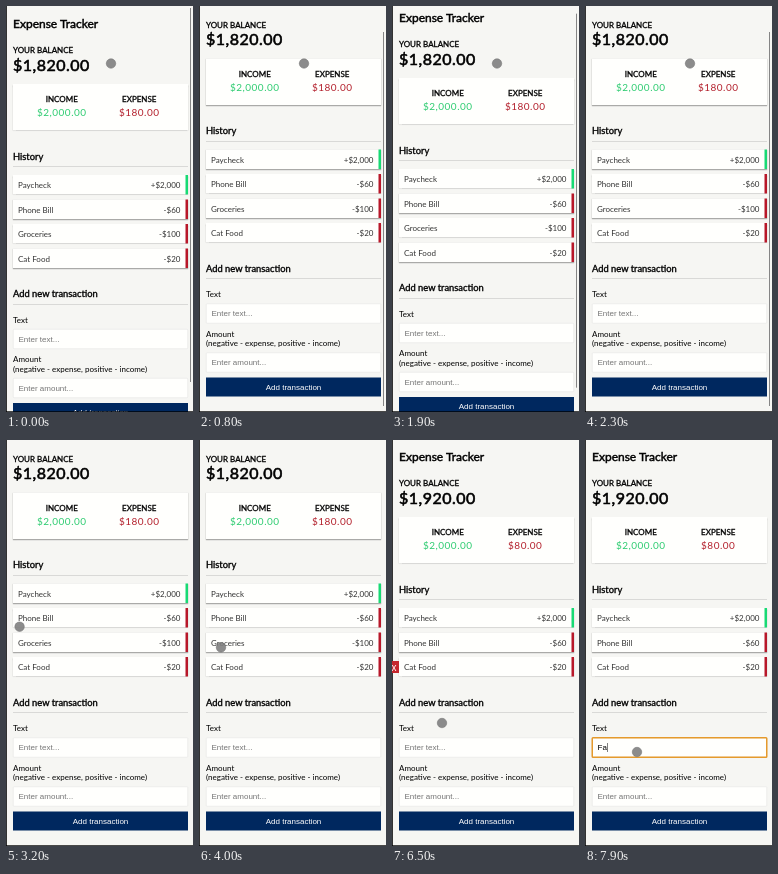
An HTML page that plays this animation: 187x406 px, repeating every 8000 ms.

```html
<!DOCTYPE html>
<html lang="en">
<head>
<meta charset="utf-8">
<title>Expense Tracker</title>
<style>
  html, body { margin: 0; width: 100%; height: 100%; overflow: hidden; background: #f6f6f3; }
  /* The phone screen is laid out at double size and shown at half scale. */
  #stage {
    position: absolute; left: 0; top: 0; width: 374px; height: 812px; overflow: hidden;
    transform: scale(.5); transform-origin: 0 0;
    font: 16px Lato, sans-serif; color: #000;
    background: linear-gradient(90deg, #333 2px, #f6f6f3 2px);
  }
  #stage::after { content: ""; position: absolute; left: 0; right: 0; bottom: 0; height: 2px; background: rgba(0,0,0,.7); }
  #page { position: absolute; left: 14px; top: 0; width: 350px; display: flow-root; }
  h1, h2, h3, h4, p, ul { margin: 0; padding: 0; }
  /* Headings are the regular weight, thickened. */
  h1, h2, h3, h4 { font-weight: 400; -webkit-text-stroke: .037em; }
  h1 { font-size: 32px; letter-spacing: 1px; }
  h2 { font-size: 24px; margin: 20px 0 29px; }
  h3 { font-size: 18.72px; border-bottom: 1px solid #bbb; padding-bottom: 10px; margin: 40px 0 10px; }
  h4 { font-size: 16px; text-transform: uppercase; }
  .card, li { background: #fffffd; box-shadow: 0 1px 3px rgba(0,0,0,.12), 0 1px 2px rgba(0,0,0,.24); }
  .card { display: flex; padding: 20px; margin: 20px 0 40px; text-align: center; }
  .card div { flex: 1; }
  .card p { font-size: 20px; letter-spacing: 1px; margin: 5px 0; }
  .plus { color: #2ecc71; }
  .minus { color: #b3202c; }
  ul { list-style: none; margin: 16px 0 40px; }
  li {
    position: relative; display: flex; justify-content: space-between;
    padding: 10px; margin-bottom: 10px; border-right: 5px solid;
  }
  li.plus { border-color: #18da74; }
  li.minus { border-color: #b8182a; }
  li span { color: #333; }
  .del {
    position: absolute; left: 0; top: 50%; transform: translate(-100%, -50%); opacity: 0;
    padding: 2px 5px; background: #c5262d; color: #fff;
    font: 20px/20px "Liberation Sans", Arial, sans-serif;
  }
  label { display: inline-block; margin: 10px 0; }
  .field, .btn { font: 16px/18px "Liberation Sans", Arial, sans-serif; padding: 10px; }
  .field { background: #fffffd; border: 1px solid #dedede; border-radius: 2px; color: #757575; white-space: nowrap; }
  .field.focus { outline: 3px solid #e59a2c; outline-offset: -2px; }
  .field.typed { color: #000; }
  #caret { display: inline-block; width: 1px; height: 18px; margin-right: -1px; background: #000; vertical-align: top; }
  .btn { background: #00285f; color: #fff; text-align: center; margin: 10px 0 30px; }
  #bar { position: absolute; left: 368px; top: 4px; width: 2px; height: 748px; background: #858585; }
  #cursor {
    position: absolute; left: -10px; top: -10px; width: 18px; height: 18px;
    border: 1px solid #6e6e6e; border-radius: 50%; background: rgba(128,128,128,.9);
  }
  #cursor.pressed { background: rgba(50,30,30,.65); border-color: #5a2020; }
</style>
</head>
<body>
<div id="stage">
  <div id="page">
    <h2>Expense Tracker</h2>
    <h4>Your Balance</h4>
    <h1 id="balance"></h1>
    <div class="card">
      <div><h4>Income</h4><p class="plus">$2,000.00</p></div>
      <div><h4>Expense</h4><p class="minus" id="expense"></p></div>
    </div>
    <h3>History</h3>
    <ul>
      <li class="plus"><span>Paycheck</span><span>+$2,000</span></li>
      <li class="minus"><span>Phone Bill</span><span>-$60</span></li>
      <li class="minus" id="groceries"><span>Groceries</span><span>-$100</span><b class="del">x</b></li>
      <li class="minus" id="catFood"><span>Cat Food</span><span>-$20</span><b class="del">x</b></li>
    </ul>
    <h3>Add new transaction</h3>
    <div><label>Text</label></div>
    <div class="field" id="textField"><span id="before"></span><i id="caret"></i><span id="hint"></span></div>
    <div><label>Amount<br>(negative - expense, positive - income)</label></div>
    <div class="field">Enter amount...</div>
    <div class="btn">Add transaction</div>
  </div>
  <div id="bar"></div>
  <div id="cursor"></div>
</div>
<script>
const LOOP = 8000, TICK = 100;
const PRESSED = 5500, REMOVED = 6000, LEFT_ROW = 6700, FOCUSED = 7100;
const MAX_SCROLL = 25.5, BAR_TRAVEL = 24;

// Each move is [start, end, ...destination].
const scrollMoves = [
  [700, 800, MAX_SCROLL], [1200, 1400, 0], [1700, 1900, 6], [2200, 2300, MAX_SCROLL]
];
const cursorMoves = [
  [2300, 2800, 14, 184],
  [3100, 3600, 10, 210],
  [3700, 4000, 22, 207.5],
  [4100, 4300, 4, 202],
  [4300, 4500, 22, 208],
  [4600, 4800, 2.5, 202],
  [6200, 6500, 50, 283],
  [6600, 7000, 52, 312]
];

const $ = id => document.getElementById(id);
const clamp = v => Math.min(1, Math.max(0, v));
const smooth = k => k * k * (3 - 2 * k);
const between = (t, from, to) => t >= from && t < to;
const setText = (el, text) => { if (el.textContent !== text) el.textContent = text; };

function follow(moves, origin, t) {
  return moves.reduce((pos, [start, end, ...dest]) => {
    const k = smooth(clamp((t - start) / (end - start)));
    return pos.map((v, i) => v + (dest[i] - v) * k);
  }, origin);
}

function render(t) {
  const removed = t >= REMOVED, focused = t >= FOCUSED;
  const scroll = removed ? 1 : follow(scrollMoves, [0], t)[0];
  const [x, y] = follow(cursorMoves, [105, 57.5], t);
  const typed = "Fa".slice(0, Math.max(0, Math.floor((t - 7500) / 200)));

  $("page").style.transform = `translateY(${-2 * scroll}px)`;
  $("bar").style.transform = `translateY(${2 * BAR_TRAVEL * scroll / MAX_SCROLL}px)`;
  $("bar").style.opacity = between(t, 0, 1100) || between(t, 1300, 2600) ? 1 : 0;
  $("cursor").style.transform = `translate(${2 * x}px, ${2 * y}px)`;
  $("cursor").classList.toggle("pressed", between(t, PRESSED, REMOVED));

  setText($("balance"), removed ? "$1,920.00" : "$1,820.00");
  setText($("expense"), removed ? "$80.00" : "$180.00");
  $("groceries").style.display = removed ? "none" : "";
  $("groceries").lastChild.style.opacity = clamp((t - 5100) / 200);
  $("catFood").lastChild.style.opacity = removed ? clamp((LEFT_ROW + 100 - t) / 200) : 0;

  $("textField").classList.toggle("focus", focused);
  $("textField").classList.toggle("typed", typed !== "");
  setText($("before"), typed);
  setText($("hint"), typed ? "" : "Enter text...");
  $("caret").style.visibility = focused ? "visible" : "hidden";
}

const start = performance.now();
function frame() {
  const t = (performance.now() - start) % LOOP;
  render(Math.floor(t / TICK) * TICK);
  requestAnimationFrame(frame);
}
frame();
</script>
</body>
</html>
```
